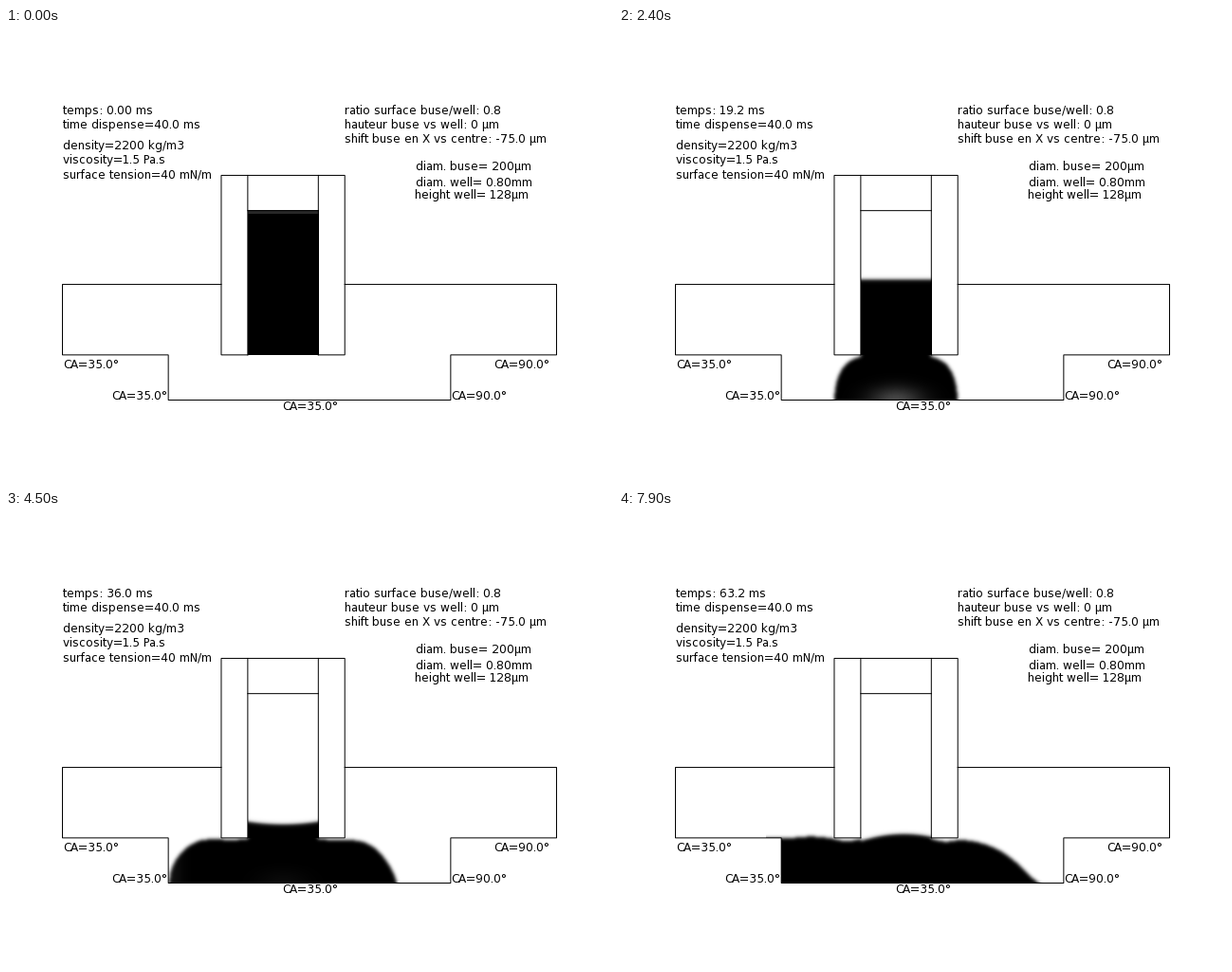
Write a matplotlib script that moves like this. It is 640x480 px and loops after 8000 ms.

```python
import numpy as np
import matplotlib.pyplot as plt
from matplotlib.animation import FuncAnimation

W, H, DPI = 640, 480, 80
PX = 72 / DPI
FRAMES, STEP = 80, 100
plt.rcParams["text.hinting_factor"] = 1  # whole-pixel letter spacing

# Geometry: dimensions in mm on a common scale
MM = 521 / 1.4
MID, FLOOR = W / 2, 392.5
AXIS = MID - 0.075 * MM
BORE, WALL = 0.1 * MM, 0.175 * MM
WELL, ROOM = 0.4 * MM, 0.7 * MM
RIM = FLOOR - 0.128 * MM
CEILING = RIM - 0.2 * MM
CAP, START = RIM - 0.509 * MM, RIM - 0.409 * MM

OUTLINES = [
    [(AXIS - WALL, CEILING), (MID - ROOM, CEILING), (MID - ROOM, RIM),
     (MID - WELL, RIM), (MID - WELL, FLOOR), (MID + WELL, FLOOR),
     (MID + WELL, RIM), (MID + ROOM, RIM), (MID + ROOM, CEILING),
     (AXIS + WALL, CEILING)],
    [(AXIS - BORE, RIM), (AXIS - WALL, RIM), (AXIS - WALL, CAP),
     (AXIS + WALL, CAP), (AXIS + WALL, RIM), (AXIS + BORE, RIM)],
    [(AXIS - BORE, CAP), (AXIS - BORE, RIM)],
    [(AXIS + BORE, CAP), (AXIS + BORE, RIM)],
    [(AXIS - BORE, START), (AXIS + BORE, START)],
]
LABELS = [
    (60, 106, "time dispense=40.0 ms"),
    (60, 128, "density=2200 kg/m3"),
    (60, 143, "viscosity=1.5 Pa.s"),
    (60, 159, "surface tension=40 mN/m"),
    (357, 91, "ratio surface buse/well: 0.8"),
    (357, 106, "hauteur buse vs well: 0 µm"),
    (357, 121, "shift buse en X vs centre: -75.0 µm"),
    (432, 150, "diam. buse= 200µm"),
    (432, 167, "diam. well= 0.80mm"),
    (431, 180, "height well= 128µm"),
    (60, 359, "CA=35.0°"),
    (111, 392, "CA=35.0°"),
    (291, 403, "CA=35.0°"),
    (469, 392, "CA=90.0°"),
    (514, 359, "CA=90.0°"),
]

# Raster windows: the well with the nozzle rim, and the bore
X0, X1, Y0, Y1 = 155, 485, 325, 415
gx, gy = np.meshgrid(np.arange(X0, X1) + 0.5, np.arange(Y0, Y1) + 0.5)
dist, left = abs(gx - AXIS), gx < AXIS
in_well = (gy > RIM) & (gy < FLOOR) & (abs(gx - MID) < WELL)
domain = in_well | ((gy <= RIM) & (dist > WALL))

BX0, BX1, BY0, BY1 = 255, 330, 192, 345
bore_x = np.arange(BX0, BX1) + 0.5
bore_y = np.arange(BY0, BY1)[:, None] + 0.5


def gauss(n, sigma=1.9):
    d = np.subtract.outer(np.arange(n), np.arange(n))
    k = np.exp(-0.5 * (d / sigma) ** 2)
    return k / k.sum(axis=1, keepdims=True)


BLUR_Y, BLUR_X = gauss(Y1 - Y0), gauss(X1 - X0)


def ease(i, a, b):
    u = np.clip((i - a) / (b - a), 0, 1)
    return u * u * (3 - 2 * u)


def pulse(x, centre, width):
    return np.exp(-((x - centre) / width) ** 2)


def level(i, x):
    """Surface inside the nozzle: steady fall, then slow levelling."""
    u = (x - AXIS) / BORE
    edge = min(194 + 2.97 * i, 341.5) + 4.5 * ease(i, 50, 79)
    sag = 5 * pulse(i, 51, 8) - 5 * ease(i, 54, 79)
    return edge + sag * (1 - u ** 2) - 2.2 * ease(i, 50, 62) * u


def spread(i):
    """Half width of the drop: steady while dispensing, then relaxing."""
    if i < 50:
        return max(BORE, 133 - 2.62 * (50 - i))
    return 133 + 20 * (1 - np.exp((50 - i) / 11))


def drop(i):
    """Superellipse that hangs from the nozzle, then sits on the floor."""
    depth = 44 * np.sin(np.pi / 2 * min(i / 17, 1))
    landed = ease(i, 17, 20)
    centre = (1 - landed) * (RIM + depth / 2) + landed * FLOOR

    right_r = spread(i)
    left_r = right_r + 0.3 * max(0, i - 50) ** 2
    radius = np.where(left, left_r, right_r)
    power = np.where(left, 0.5, 0.5 + ease(i, 25, 85))
    body = (1 - np.clip(dist / radius, 0, 1) ** 5) ** power

    hump = 5 * pulse(i, 51, 8)
    hump = np.where(left, max(hump, 2 * ease(i, 45, 60)), hump)
    dip = 3 * ease(i, 40, 52)
    lift = hump * pulse(dist, 90, 18) - dip * pulse(dist, 52, 12)

    top = centre - (centre - RIM - 0.5) * body - lift
    top = np.where(dist < BORE, level(i, gx), top)
    bottom = centre + depth / 2 * body + 40 * landed
    mask = (gy > top) & (gy < bottom) & (dist < radius)
    ink = BLUR_Y @ mask.astype(float) @ BLUR_X.T

    # Air caught under the drop, then against the left wall
    trapped = 0.4 * landed * np.exp((20 - i) / 11)
    ink *= 1 - trapped * pulse(dist, 0, 28) * pulse(gy, FLOOR, 14)
    ink *= 1 - 0.12 * pulse(i, 51, 8) * pulse(gx, MID - WELL, 14)
    return ink * domain


def liquid(i):
    img = np.full((H, W), 255.0)
    bore = img[BY0:BY1, BX0:BX1]
    if i == 0:
        bore[:] = 0
        bore[:4] = 40
        return img
    img[Y0:Y1, X0:X1] *= 1 - drop(i)
    bore[:] = 127.5 * (1 - np.tanh((bore_y - level(i, bore_x)) / 2.2))
    return img


fig = plt.figure(figsize=(W / DPI, H / DPI), dpi=DPI, facecolor="white")
ax = fig.add_axes([0, 0, 1, 1])
ax.axis("off")
pic = ax.imshow(np.full((H, W), 255.0), cmap="gray", vmin=0, vmax=255,
                extent=(0, W, H, 0), interpolation="nearest", aspect="auto")
ax.set_xlim(0, W)
ax.set_ylim(H, 0)

for line in OUTLINES:
    ax.plot(*zip(*line), color="black", lw=PX, snap=False,
            solid_capstyle="projecting", solid_joinstyle="miter")


def label(x, y, text):
    return ax.text(x, y, text, family="DejaVu Sans", size=12 * PX,
                   color="black", va="baseline", ha="left")


for item in LABELS:
    label(*item)
clock = label(60, 91, "")


def update(i):
    t = 0.8 * i
    clock.set_text(f"temps: {t:.{2 if t < 9.99 else 1}f} ms")
    pic.set_data(liquid(i))
    return pic, clock


anim = FuncAnimation(fig, update, frames=FRAMES, interval=STEP,
                     repeat=True, repeat_delay=0)
plt.show()
```
